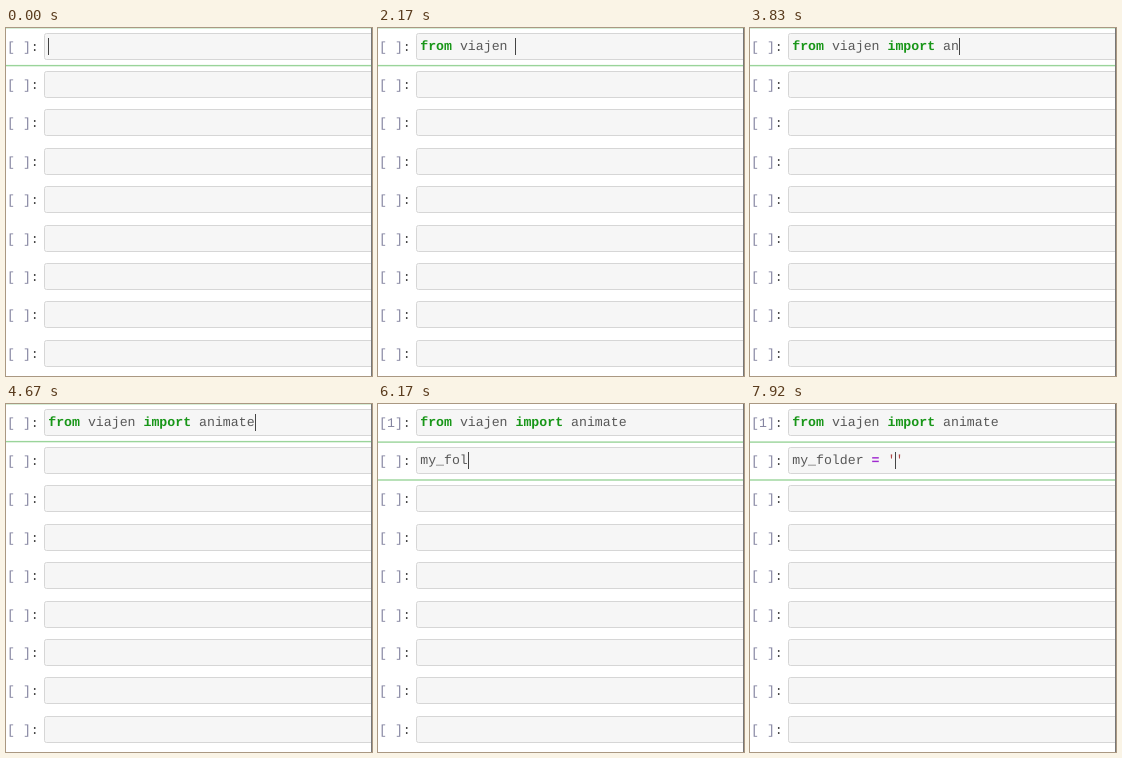
Write an HTML page with a canvas that moves like this. It is 366 px wide and 348 px high and loops after 8 s.

```html
<!DOCTYPE html>
<html lang="en">
<head>
<meta charset="utf-8">
<title>Notebook typing</title>
<style>
  html, body { margin: 0; width: 100%; height: 100%; overflow: hidden; background: #fff; }
  canvas { display: block; }
</style>
</head>
<body>
<canvas id="stage" width="366" height="348"></canvas>
<script>
const ctx = document.getElementById('stage').getContext('2d');
const LOOP = 8000, TICK = 1000 / 12, BLINK = 177;
const ADVANCE = 7.94, TEXT_X = 42.2, PROMPT_X = 1, ROW = 38.4, ROWS = 9;
const RUN_AT = 4880;
const FONT = '13.23px "Liberation Mono", monospace';

// Each key press: one entry per typed character, in ticks.
const cells = [
  { text: 'from viajen import animate', start: -40,
    keys: [8, 10, 12, 13, 14, 16, 18, 19, 21, 23, 24, 26, 32, 34, 36, 37, 38, 40, 42,
           44, 46, 47, 48, 50, 51, 52] },
  { text: "my_folder = '", start: RUN_AT,
    keys: [68, 69, 70, 71, 72, 73, 75, 76, 77, 81, 85, 87, 90] }
];
const keyTime = tick => tick * TICK - 23;

function tokenStyle(token) {
  if (token === 'from' || token === 'import') return ['bold ', '#189618'];
  if (token === '=') return ['bold ', '#a02ad0'];
  if (token[0] === "'") return ['', '#b04848'];
  return ['', '#585858'];
}

function drawText(text, x, y, color, weight = '') {
  ctx.font = weight + FONT;
  ctx.fillStyle = color;
  ctx.fillText(text, x, y);
}

function drawCode(text, y) {
  for (const match of text.matchAll(/\S+/g)) {
    const [weight, color] = tokenStyle(match[0]);
    drawText(match[0], TEXT_X + match.index * ADVANCE, y, color, weight);
  }
}

// The box runs on past the right edge of the stage.
function drawBox(top) {
  ctx.beginPath();
  ctx.roundRect(38.5, top + .5, 340, 26, 2);
  ctx.fillStyle = '#f6f6f6';
  ctx.strokeStyle = '#d6d6d6';
  ctx.fill();
  ctx.stroke();
}

function drawPrompt(label, y) {
  [...label].forEach((char, i) =>
    drawText(char, PROMPT_X + i * ADVANCE, y, char === ':' ? '#444' : '#8484a0'));
}

function drawCell(row, t, active) {
  const top = Math.round(4.6 + row * ROW), baseline = top + 17;
  drawBox(top);
  drawPrompt(row === 0 && t >= RUN_AT ? '[1]:' : '[ ]:', baseline + .5);

  const cell = cells[row];
  if (!cell) return;
  const pressed = cell.keys.map(keyTime).filter(time => time <= t);
  const count = pressed.length;
  const typed = cell.text.slice(0, count);
  drawCode(typed.endsWith("'") ? typed + "'" : typed, baseline);

  const since = t - (count ? pressed[count - 1] : cell.start);
  if (active && Math.floor(since / BLINK) % 2 === 0) {
    ctx.fillStyle = '#444';
    ctx.fillRect(Math.round(TEXT_X + count * ADVANCE), top + 5, 1, 17);
  }
}

function drawSelection(row) {
  const top = row * ROW - 1;
  ctx.fillStyle = '#9ad49a';
  for (const y of [top, top + ROW - .5]) ctx.fillRect(0, y, 365, 1.4);
}

function draw(now) {
  const t = Math.floor((now % LOOP) / TICK + .05) * TICK;
  const selected = t >= RUN_AT ? 1 : 0;
  ctx.fillStyle = '#fff';
  ctx.fillRect(0, 0, 366, 348);
  drawSelection(selected);
  for (let row = 0; row < ROWS; row++) drawCell(row, t, row === selected);
  ctx.fillStyle = '#777';
  ctx.fillRect(365, 0, 1, 348);
}

ctx.textRendering = 'geometricPrecision';
const begin = performance.now();
function frame() {
  draw(performance.now() - begin);
  requestAnimationFrame(frame);
}
frame();
</script>
</body>
</html>
```
